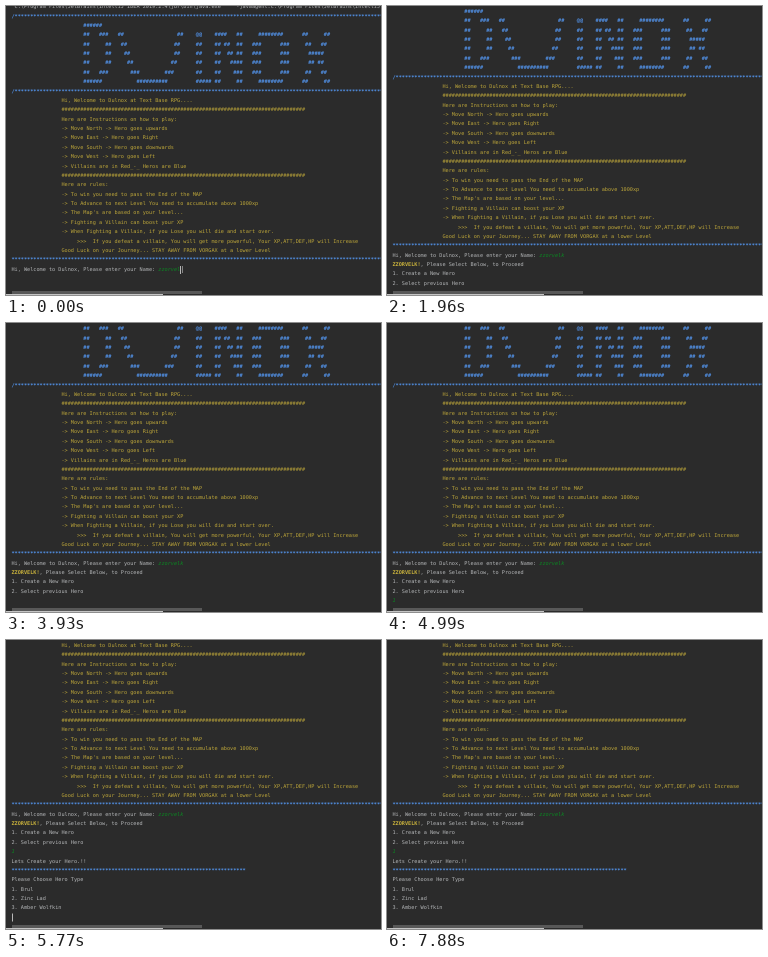
An HTML page that plays this animation: 375x289 px, repeating every 8 s.

```html
<!DOCTYPE html>
<html lang="en">
<head>
<meta charset="utf-8">
<style>
html, body { margin: 0; width: 100%; height: 100%; overflow: hidden; background: #2b2b2b; }
#stage { position: relative; width: 375px; height: 289px; overflow: hidden; }
#log { position: absolute; left: 5.5px; top: -2.8px; white-space: pre; color: #b4b6b8;
  font: 5.19px/9.39px "DejaVu Sans Mono", "Noto Sans Mono", monospace; text-rendering: geometricPrecision; }
#log div { height: 9.39px; }
.blue { color: #5394ec; font-weight: bold; }
.gold { color: #bda63a; }
.hero { color: #c9b23c; font-weight: bold; }
.input { color: #0a8a22; font-style: italic; }
.bar { position: absolute; background: #b8b8b8; }
#beam { left: 176px; top: 260px; width: 1px; height: 7px; background: #858585; }
#log #caret { width: 1px; height: 8px; }
#scroll { left: 6px; top: 285px; width: 190px; height: 3px; background: #585858; }
#edge { left: 0; top: 288px; width: 157px; height: 1px; background: #c4c4c4; }
</style>
</head>
<body>
<div id="stage">
  <div id="log"></div>
  <div id="beam" class="bar"></div>
  <div id="scroll" class="bar"></div>
  <div id="edge" class="bar"></div>
</div>
<script>
const LOOP = 8000, STEP = 130, ROW = 9.39, COL = 3.125;
const LAST_KEY = 260, ENTER_NAME = 1700, TYPE_CHOICE = 4990, ENTER_CHOICE = 5250;
const PROMPT = 'Hi, Welcome to Dulnox, Please enter your Name: ';
const NAME = 'zzorvelk';
const $ = id => document.getElementById(id);
const log = $('log');

// Adds one console row of [text, class] parts, visible from time `at`.
const rows = [];
function row(at, ...parts) {
  const el = document.createElement('div');
  for (const [text, cls] of parts) {
    const span = document.createElement('span');
    span.textContent = text;
    if (cls) span.className = cls;
    el.append(span);
  }
  log.append(el);
  rows.push({ el, at });
  return el;
}
const blue = text => row(0, [text, 'blue']);
const gold = text => row(0, [' '.repeat(16) + text, 'gold']);

// Banner letters: start column, then seven rows each.
const letters = [
  [23, '######|##   ###|##     ##|##     ##|##     ##|##   ###|######'],
  [34, '|##                 ##| ##               ##|  ##              ##|   ##            ##|    ###        ###|      ##########'],
  [59, '|@@|##|##|##|##|#####'],
  [65, '|####   ##|## ##  ##|##  ## ##|##   ####|##    ###|##     ##'],
  [77, '|  ########|###      ###|###      ###|###      ###|###      ###|  ########'],
  [93, '|##     ##| ##   ##|  #####|  ## ##| ##   ##|##     ##'],
];
const rule = '/' + '*'.repeat(130);
const hashes = '#'.repeat(78);

row(0, [String.raw`"C:\Program Files\JetBrains\IntelliJ IDEA 2019.2.4\jbr\bin\java.exe"   "-javaagent:C:\Program Files\JetBrains\IntelliJ IDEA 2019.2.4\lib`]);
blue(rule);
for (let i = 0; i < 7; i++)
  blue(letters.reduce((line, [col, art]) => line.padEnd(col) + art.split('|')[i], ''));
blue(rule);
[
  'Hi, Welcome to Dulnox at Text Base RPG....',
  hashes,
  'Here are Instructions on how to play:',
  '-> Move North -> Hero goes upwards',
  '-> Move East -> Hero goes Right',
  '-> Move South -> Hero goes downwards',
  '-> Move West -> Hero goes Left',
  '-> Villains are in Red_-_ Heros are Blue',
  hashes,
  'Here are rules:',
  '-> To win you need to pass the End of the MAP',
  '-> To Advance to next Level You need to accumulate above 1000xp',
  "-> The Map's are based on your level...",
  '-> Fighting a Villain can boost your XP',
  '-> When Fighting a Villain, if you Lose you will die and start over.',
  '     >>>  If you defeat a villain, You will get more powerful, Your XP,ATT,DEF,HP will Increase',
  'Good Luck on your Journey... STAY AWAY FROM VORGAX at a lower Level',
].forEach(gold);
blue('*'.repeat(130));

const name = row(0, [PROMPT], ['', 'input']).lastChild;
row(ENTER_NAME, [NAME.toUpperCase() + '!', 'hero'], [', Please Select Below, to Proceed']);
row(ENTER_NAME, ['1. Create a New Hero']);
row(ENTER_NAME, ['2. Select previous Hero']);
row(TYPE_CHOICE, ['1', 'input']);
row(ENTER_CHOICE, ['Lets Create your Hero.!!']);
row(ENTER_CHOICE, ['*'.repeat(75), 'blue']);
['Please Choose Hero Type', '1. Brul', '2. Zinc Lad', '3. Amber Wolfkin']
  .forEach(text => row(ENTER_CHOICE, [text]));

const caret = document.createElement('div');
caret.id = 'caret';
caret.className = 'bar';
log.append(caret);

// Stepped smooth scroll, from 0 to 1.
const ease = [0, 0.18, 0.6, 0.9, 1];
const glide = (t, start) => ease[Math.max(0, Math.min(4, Math.floor((t - start) / STEP)))];
const show = (el, on) => { el.style.visibility = on ? 'visible' : 'hidden'; };

// Row and column of the text caret.
function caretCell(t, typed) {
  if (t < ENTER_NAME) return [28, PROMPT.length + typed];
  if (t < ENTER_CHOICE) return [32, t < TYPE_CHOICE ? 0 : 1];
  return [39, 0];
}

function draw(now) {
  const t = now % LOOP;
  const shift = 23.5 * glide(t, ENTER_NAME) + 66 * glide(t, ENTER_CHOICE);
  log.style.transform = `translateY(${-shift}px)`;
  rows.forEach(({ el, at }) => show(el, t >= at));

  const typed = t < LAST_KEY ? NAME.length - 1 : NAME.length;
  name.textContent = NAME.slice(0, typed);
  show($('beam'), t < LAST_KEY);

  const [line, col] = caretCell(t, typed);
  caret.style.top = line * ROW + 'px';
  caret.style.left = col * COL + 'px';
  show(caret, t < ENTER_NAME || t >= 2480 && (t - 370) % 1320 < 660);
  requestAnimationFrame(draw);
}
requestAnimationFrame(draw);
</script>
</body>
</html>
```
